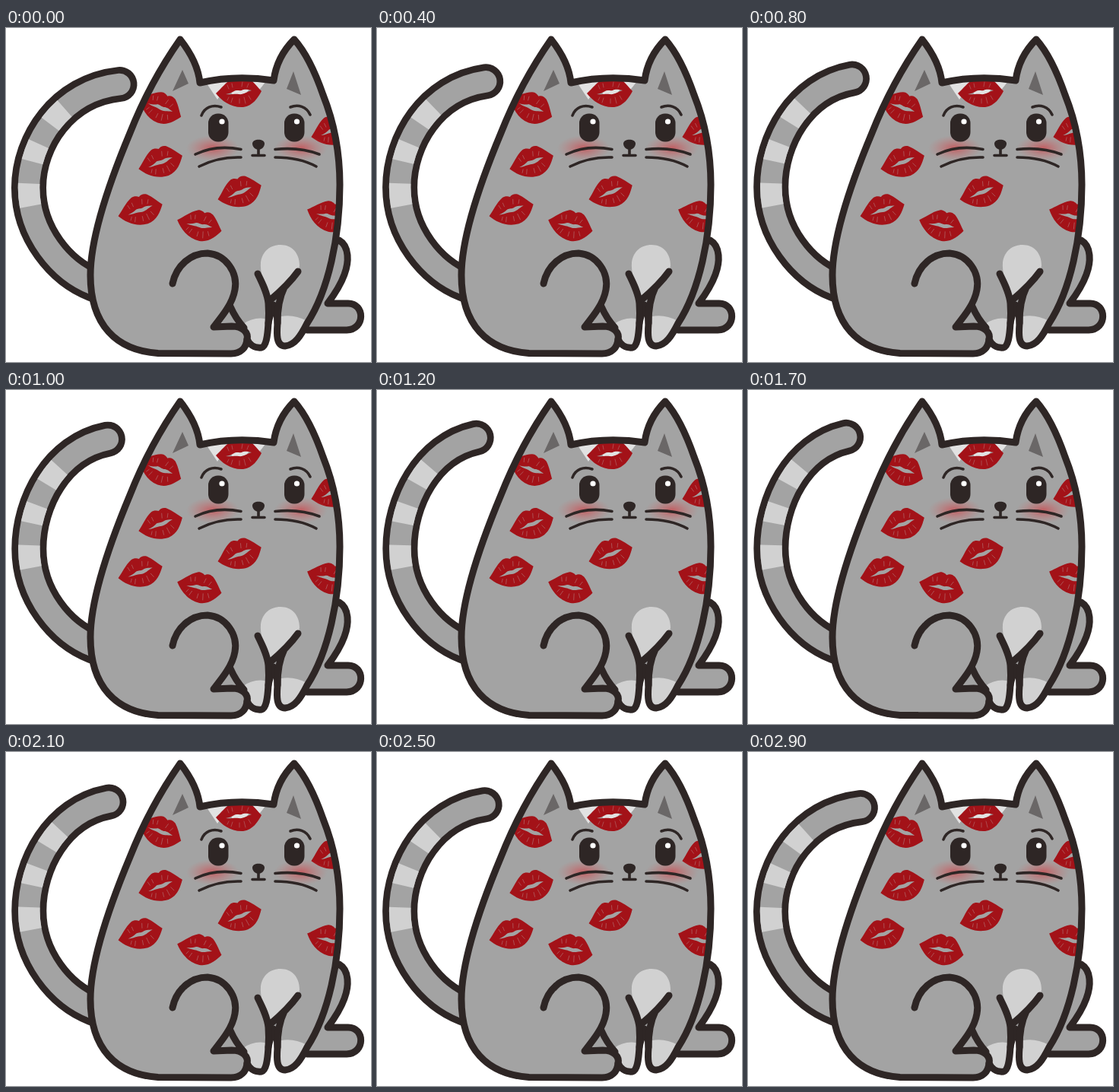
Recreate the animation shown at these times as an HTML page. Size 480 by 439 pixels, loop 3000 ms.

```html
<!DOCTYPE html>
<html lang="en">
<head>
<meta charset="utf-8">
<title>Kissed cat</title>
<style>
  html, body { margin: 0; width: 100%; height: 100%; overflow: hidden; background: #fff; }
  svg { display: block; width: 100%; height: 100%; }
  .ink { fill: none; stroke: #2e2625; stroke-width: 9; stroke-linecap: round; stroke-linejoin: round; }
  .fur { fill: #a3a3a3; }
  .pale { fill: #d1d1d1; }
  .dark { fill: #2e2625; }
  .fine { stroke-width: 3.6; }
  .tail { fill: none; stroke-linecap: round; }
</style>
</head>
<body>
<svg viewBox="0 0 480 439">
  <defs>
    <path id="body" d="M229 15C244 34 253 52 255 72Q302 61 352 69C355 46 366 28 379 15C396 34 408 62 417 88C433 128 439 168 439 206C439 275 424 345 396 388C388 404 380 417 367 418C355 418 356 402 357 388C357 376 355 369 352 364C350 372 346 380 345 388C344 405 342 419 336 420C327 421 320 416 317 409C316 420 309 428 296 428L200 427.500C145 424 111 390 111 325C111 270 140 193 163 138C180 95 203 52 229 15Z"/>
    <clipPath id="inside"><use href="#body"/></clipPath>
    <radialGradient id="blush">
      <stop offset="0" stop-color="#cf3f45" stop-opacity=".7"/>
      <stop offset=".4" stop-color="#cf4f53" stop-opacity=".42"/>
      <stop offset="1" stop-color="#cf6a6a" stop-opacity="0"/>
    </radialGradient>
    <g id="kiss">
      <path fill="#a31218" fill-rule="evenodd" d="M-30 2C-23 -4 -17 -13 -8 -18C-4 -20 0 -18 2 -17C5 -20 9 -20 13 -18C20 -13 25 -6 30 -1C25 8 19 18 6 20C-10 21 -22 12 -30 2ZM-17 3C-10 4 -5 2 0 3C6 4 10 0 17 -2C11 -3 8 -4 4 -2C0 -1 -3 -3 -6 -1C-9 1 -12 2 -17 3Z"/>
      <path fill="none" stroke="#b99b9b" stroke-opacity=".6" stroke-width=".7" stroke-linecap="round" d="M-13 -4l-2 -5M-8 -6l-1 -5M4 -7l1 -6M11 -6l2 -5M-13 7l-2 4M-8 8l-2 6M1 9l0 6M7 7l2 8M13 5l3 5"/>
    </g>
  </defs>

  <path class="tail" stroke="#2e2625" stroke-width="46"/>
  <path class="tail" stroke="#a3a3a3" stroke-width="28.5"/>
  <path class="tail" stroke="#d1d1d1" stroke-width="28.5" style="stroke-linecap:butt" stroke-dasharray="0 138 30 29 25 30 28 999"/>

  <path class="ink" style="fill:#a3a3a3" d="M438 279C452 287 451 308 445 324C440 338 432 350 423 362L450 362C472 362 473 396 448 397L396 397"/>

  <use href="#body" class="fur"/>
  <g clip-path="url(#inside)">
    <path fill="#e2e2e2" d="M262 70L278 94L290 76L306 99L320 80L331 84L342 70Z"/>
    <g id="kisses"></g>
    <path class="pale" d="M312 389Q328 377 350 384L346 424L322 420ZM352 382Q373 373 396 385L388 424L354 424Z"/>
  </g>
  <path class="pale" d="M347 357C338 335 334 320 335 308C337 294 347 285 361 285C376 285 386 296 386 312Q385 320 382 323L350 356Z"/>

  <g class="ink">
    <use href="#body"/>
    <path d="M219 336C224 312 243 296 265 296C290 298 305 322 301 344C298 362 285 378 273 393L297 392C312 392 319 401 317 409"/>
    <path d="M295 366Q302 382 313 394"/>
    <path d="M331 323C337 335 344 349 345 362Q346 375 345 388M384 320Q371 338 347 358M366 341C359 355 357 372 357 388"/>
  </g>

  <path fill="#6a6767" d="M232 55L219 83L240 73ZM378 57L369 80L388 88Z"/>
  <ellipse cx="272" cy="158" rx="35" ry="17" fill="url(#blush)"/>
  <ellipse cx="388" cy="158" rx="35" ry="17" fill="url(#blush)"/>
  <g class="dark">
    <rect x="266" y="112.500" width="26.500" height="37" rx="12.500"/>
    <rect x="366" y="112.500" width="26.500" height="37" rx="12.500"/>
    <path d="M324 152C324 145 340 145 340 152C340 157 335 160 332 160C329 160 324 157 324 152Z"/>
  </g>
  <circle cx="284" cy="123" r="3.600" fill="#fff"/>
  <circle cx="382.500" cy="123" r="3.600" fill="#fff"/>
  <path class="ink fine" d="M257 115C261 104 272 100 283 104M374 104C384 100 395 103 400 114M332 156V167M324 167.500H340M249 166Q276 153 309 159.500M254 182Q279 169 309 170M354 159.500Q386 156 412 166M354 170Q386 170 408 182"/>
</svg>
<script>
const KISSES = [ // x, y, angle
  [203, 104, 27], [203, 176, -14], [176.5, 239, -12], [254.5, 259, 17],
  [307, 215.5, -15], [306, 84, 0], [430, 134, -14], [425, 247, 20]
];
document.getElementById('kisses').innerHTML = KISSES.map(([x, y, a]) =>
  `<use href="#kiss" transform="translate(${x} ${y}) rotate(${a})"/>`).join('');

// upper half of the tail: joint, two handles, tip
const LOW = [30, 210, 30, 149, 74, 82, 149.5, 74];
const HIGH = [30.5, 208, 30.5, 147, 63, 76, 126, 60];
const LOOP = 3000, STEP = 100;
const tails = document.querySelectorAll('.tail');

function draw(now) {
  const t = Math.floor(now % LOOP / STEP) * STEP;
  const k = 1 - Math.abs(1 - 2 * t / LOOP);
  const [x, y, ...rest] = LOW.map((v, i) => v + (HIGH[i] - v) * k);
  const d = `M116 337C72 320 ${x} 270 ${x} ${y}C${rest.join(' ')}`;
  tails.forEach(p => p.setAttribute('d', d));
}

const start = performance.now();
function tick() {
  draw(performance.now() - start);
  requestAnimationFrame(tick);
}
tick();
</script>
</body>
</html>
```
